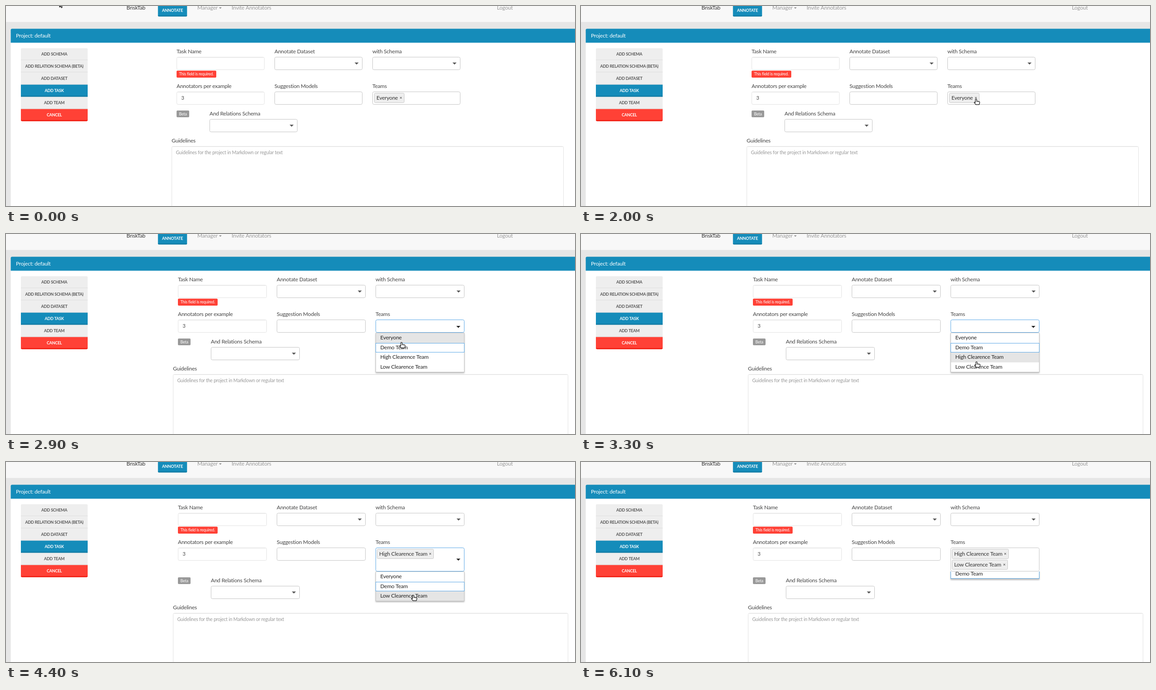
Animation of 1261 by 444 pixels, one loop 6.2 s. Source, as an HTML page with a canvas:

```html
<!DOCTYPE html>
<html lang="en">
<head>
<meta charset="utf-8">
<title>Add task</title>
<style>
html, body { margin: 0; width: 100%; height: 100%; overflow: hidden; background: #fff; }
canvas { display: block; }
</style>
</head>
<body>
<canvas id="stage" width="1261" height="444"></canvas>
<script>
const ctx = document.getElementById('stage').getContext('2d');
const LOOP = 6200, STEP = 100, ROW = 21.6;
const BLUE = '#158cba', RED = '#ff4136', FOCUS = '#5aa7e6', LINE = '#c4c4c4', INK = '#444';

// Pointer route: time, x, y, shape
const route = [
  [0, 118, -8, 'arrow'], [200, 118, -8, 'arrow'], [500, 560, 70, 'arrow'],
  [700, 1063, 160, 'arrow'], [800, 1000, 188, 'arrow'], [900, 926, 202, 'beam'],
  [1600, 885, 202, 'beam'], [1700, 880, 205, 'hand'], [2000, 876, 206, 'hand'],
  [2100, 876, 206, 'beam'], [2400, 876, 205, 'beam'], [2600, 877, 224, 'hand'],
  [2900, 877, 240, 'hand'], [3100, 877, 283, 'hand'], [3400, 877, 283, 'hand'],
  [3600, 877, 245, 'hand'], [3900, 879, 247, 'hand'], [4100, 885, 266, 'hand'],
  [4400, 903, 295, 'hand'], [5000, 903, 295, 'hand'], [5100, 732, 242, 'hand'],
  [5200, 560, 175, 'arrow'], [5700, 68, 2, 'arrow'], [5900, 57, -5, 'arrow'],
  [6000, 57, -30, 'arrow'], [LOOP, 57, -30, 'arrow']
];
const shapes = {
  arrow: new Path2D('M.5.5V10.5L3 8.3L4.8 12L6.6 11.2L5 7.6H8Z'),
  hand: new Path2D('M-2 1.6Q-.5-.6 1 1.6V5L6.5 6Q8 6.6 7.6 8.5L6.5 12.8H-1L-4.6 8.4Q-4.4 6.6-2 8.2Z'),
  beam: new Path2D('M-2.5-6.5H-.5M1.5-6.5H3.5M.5-6V7M-2.5 7.5H-.5M1.5 7.5H3.5')
};

function fill(x, y, w, h, color) {
  ctx.fillStyle = color;
  ctx.fillRect(x, y, w, h);
}

function outline(x, y, w, h, color) {
  ctx.strokeStyle = color;
  ctx.lineWidth = 1;
  ctx.strokeRect(x + 0.5, y + 0.5, w - 1, h - 1);
}

function box(x, y, w, h, color, border, r = 3) {
  const o = border ? 0.5 : 0;
  ctx.beginPath();
  ctx.roundRect(x + o, y + o, w - 2 * o, h - 2 * o, r);
  ctx.fillStyle = color;
  ctx.fill();
  if (!border) return;
  ctx.strokeStyle = border;
  ctx.lineWidth = 1;
  ctx.stroke();
}

function text(str, x, y, color = INK, size = 12, bold = false, align = 'left') {
  ctx.font = `${bold ? 'bold ' : ''}${size}px Lato, sans-serif`;
  ctx.letterSpacing = '-0.22px';
  ctx.textAlign = align;
  ctx.fillStyle = color;
  ctx.fillText(str, x, y);
}

function triangle(x, y, w, h, color) {
  ctx.fillStyle = color;
  ctx.beginPath();
  ctx.moveTo(x - w / 2, y);
  ctx.lineTo(x + w / 2, y);
  ctx.lineTo(x, y + h);
  ctx.fill();
}

function clipRound(x, y, w, h, r, paint) {
  ctx.save();
  ctx.beginPath();
  ctx.roundRect(x, y, w, h, r);
  ctx.clip();
  paint();
  ctx.restore();
}

function button(label, x, y, w, h, color, edge, ink, edgeH) {
  fill(x, y, w, h, color);
  fill(x, y + h - edgeH, w, edgeH, edge);
  text(label, x + w / 2, y + 16.5, ink, 9, true, 'center');
}

function input(x, y, w, h) {
  box(x, y, w, h, '#fff', '#e2e2e2');
  fill(x + 2, y + 1, w - 4, 1, '#eee');
}

function select(x, y, w, arrow = true) {
  box(x, y, w, 29, '#fff', LINE);
  if (arrow) triangle(x + w - 13, y + 12.5, 9, 4.5, '#555');
}

function chip(label, x, y, w) {
  box(x, y, w, 22, '#eee', '#c8c8c8', 2);
  text(label, x + 5, y + 14.5, '#333');
  text('×', x + w - 8, y + 14, '#333', 10, false, 'center');
}

function caret(x, y) {
  fill(x, y, 1, 15, '#222');
}

function frame() {
  fill(0, 0, 1261, 444, '#e6e6e6');
  fill(0, 0, 1261, 35.5, '#f8f8f8');
  text('BriskTab', 267, 8, '#333');
  clipRound(336.5, -10, 65, 33.5, 3, () =>
    button('ANNOTATE', 336.5, -3.5, 65, 27, BLUE, '#127ba3', '#fff', 2.5));
  text('Manager', 424, 8, '#999');
  triangle(475, 3, 6, 3, '#888');
  text('Invite Annotators', 500, 8, '#999');
  text('Logout', 1088, 8, '#999');

  fill(10.5, 60, 1251, 384, '#fff');
  clipRound(10.5, 50.5, 1260, 31, [3, 0, 0, 0], () => fill(10, 50, 1251, 32, BLUE));
  text('Project: default', 22, 70, '#fff');

  clipRound(33, 93.5, 148, 162.3, 3, () => {
    ['ADD SCHEMA', 'ADD RELATION SCHEMA (BETA)', 'ADD DATASET', 'ADD TASK', 'ADD TEAM', 'CANCEL']
      .forEach((label, i) => {
        const [color, edge, ink, edgeH] = i === 3 ? [BLUE, '#127ba3', '#fff', 2.5]
          : i === 5 ? [RED, '#f01c10', '#fff', 2.5] : ['#eee', '#e0e0e0', '#555', 1.5];
        button(label, 33, 93.5 + i * 27.05, 148, 27.05, color, edge, ink, edgeH);
      });
  });
}

function form(t) {
  const wide = t >= 2100, down = t >= 3500 ? 24 : 0;
  const focused = wide && t < 6000;
  const [a, b, c, w] = wide ? [381, 600, 819, 197] : [378, 595, 812, 195];

  text('Task Name', a, 105);
  input(a, 113, w, 29);
  box(a, 143.5, 88, 15.5, RED, null, 2);
  text('This field is required.', a + 5.5, 154, '#fff', 9);
  text('Annotate Dataset', b, 105);
  select(b, 113, w);
  text('with Schema', c, 105);
  select(c, 113, w);

  text('Annotators per example', a, 182);
  input(a, 190, w, 29);
  text('3', a + 10.5, 208, INK, 11);
  text('Suggestion Models', b, 182);
  select(b, 190, w, false);
  text('Teams', c, 182);

  box(a, 232 + down, 28, 15, '#999', null, 2);
  text('Beta', a + 5.5, 243 + down, '#fff', 9);
  text('And Relations Schema', a + 73, 243 + down);
  select(a + 73, 251 + down, w);

  const g = a - 11;
  text('Guidelines', g, 303 + down);
  input(g, 311 + down, wide ? 876 : 869, 160);
  text('Guidelines for the project in Markdown or regular text', g + 9.5, 328.5 + down, '#999', 10.5);

  box(c, 190, w, 29 + down, '#fff', focused ? FOCUS : LINE);
  if (focused) triangle(1002.5, down ? 214.5 : 204, 9, 4.5, '#222');
  if (!wide) chip('Everyone', 816, 193, 67);
  if (down) chip('High Clearence Team', 822, 193, 126);
  if (t >= 4800) chip('Low Clearence Team', 822, 217, 124);

  if (wide && t < 2800 || t === 3200) caret(830, 197);
  if (down && t < 4000) caret(830, 221);
  if (t >= 4800 && t < 5300 || t >= 5800 && t < 6000) caret(956, 221);
}

function menu(t, pointer) {
  if (t < 2100) return;
  const names = ['Everyone', 'Demo Team'];
  if (t < 3500) names.push('High Clearence Team');
  if (t < 4800) names.push('Low Clearence Team');
  const top = t < 3500 ? 219 : 243;
  const h = Math.round(names.length * ROW + 1.5);
  const open = t < 2300 ? (t - 2100) / 200 : t < 6000 ? 1 : 1 - (t - 6000) / 160;
  if (open <= 0) return;

  const y0 = Math.round(top - (1 - open) * h);
  const rowY = i => Math.round(y0 + 1 + i * ROW);
  const hover = t < 4800 && pointer.shape === 'hand' ? Math.floor((pointer.y - top - 1) / ROW) : -1;
  const picked = t >= 4800 && t < 6000;
  ctx.save();
  ctx.beginPath();
  ctx.rect(810, top, 215, 120);
  ctx.clip();
  ctx.shadowColor = 'rgba(0,0,0,.28)';
  ctx.shadowBlur = 3;
  ctx.shadowOffsetY = 2;
  fill(819, y0, 197, h, '#fff');
  ctx.shadowColor = 'transparent';
  names.forEach((name, i) => {
    if (i === hover || picked && i === 1) fill(820, rowY(i), 195, rowY(i + 1) - rowY(i), '#e5e5e5');
    text(name, 829.5, y0 + 15 + i * ROW, '#222');
  });
  outline(819, y0, 197, h, LINE);
  if (!picked) outline(819, rowY(1), 197, rowY(2) - rowY(1), FOCUS);
  ctx.restore();
}

function pointerAt(t) {
  const i = route.findIndex(k => k[0] > t) - 1;
  const [t0, x0, y0, shape] = route[i], [t1, x1, y1] = route[i + 1];
  const p = (t - t0) / (t1 - t0);
  return { x: Math.round(x0 + (x1 - x0) * p), y: Math.round(y0 + (y1 - y0) * p), shape };
}

function drawPointer({ x, y, shape }) {
  ctx.save();
  ctx.translate(x, y);
  ctx.fillStyle = '#fff';
  ctx.strokeStyle = '#111';
  ctx.lineWidth = shape === 'beam' ? 1 : 1.2;
  ctx.lineJoin = 'round';
  if (shape !== 'beam') ctx.fill(shapes[shape]);
  ctx.stroke(shapes[shape]);
  if (shape === 'hand') {
    ctx.lineWidth = 0.7;
    ctx.stroke(new Path2D('M1 5V7M3 5.5V7.2M5 6V7.5'));
  }
  ctx.restore();
}

function draw(now) {
  // The screen advances in tenths of a second
  const t = Math.floor(now % LOOP / STEP) * STEP;
  const pointer = pointerAt(t);
  frame();
  form(t);
  menu(t, pointer);
  drawPointer(pointer);
}

let start;
function tick(now) {
  start ??= now;
  draw(now - start);
  requestAnimationFrame(tick);
}
draw(0);
requestAnimationFrame(tick);
</script>
</body>
</html>
```
